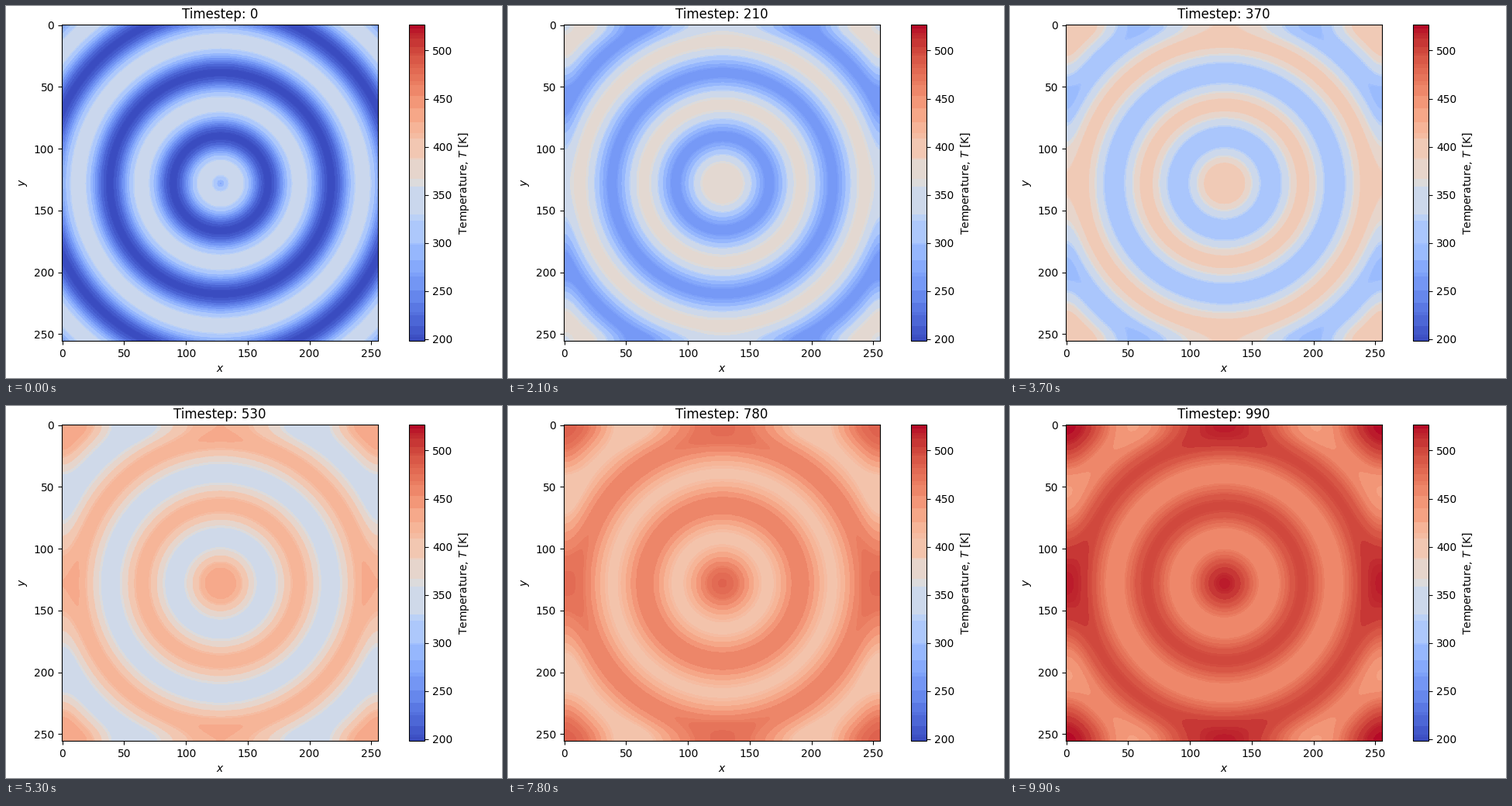
Animation, 640 px wide and 480 px high, one loop 10000 ms. Source, as a matplotlib script:

```python
import numpy as np
import matplotlib as mpl
import matplotlib.pyplot as plt
from matplotlib.animation import FuncAnimation
from matplotlib.colors import ListedColormap

W, H, DPI = 640, 480, 100
N = 256
FRAMES, STEP = 100, 10
T_MEAN, T_AMP = 273.15, 75.0
RINGS = 5               # wave periods across the domain
DIFFUSIVITY = 1 / 12    # cells^2 per timestep
HEATING = 0.206         # kelvin per timestep
T_MIN, T_MAX = T_MEAN - T_AMP, 527.0

# Radial wave on a periodic grid, diffused in Fourier space
y, x = np.mgrid[:N, :N]
wave = np.sin(2 * np.pi * RINGS / N * np.hypot(x - N / 2, y - N / 2))
spectrum = np.fft.rfft2(T_AMP * wave)
kx = 2 * np.pi * np.fft.rfftfreq(N)
ky = 2 * np.pi * np.fft.fftfreq(N)
k2 = kx[None, :] ** 2 + ky[:, None] ** 2


def temperature(t):
    decay = np.exp(-DIFFUSIVITY * k2 * t)
    return T_MEAN + HEATING * t + np.fft.irfft2(spectrum * decay, s=(N, N))


# Group the colormap into coarse RGB cells, which gives the flat bands
lut = mpl.colormaps["coolwarm"](np.arange(256), bytes=True)[:, :3].astype(int)
cells = (lut[:, 0] >> 5) * 128 + (lut[:, 1] >> 4) * 8 + (lut[:, 2] >> 5)
band = np.unique(cells, return_inverse=True)[1].ravel()
FIELD_AREA = (408 / N) ** 2
BAR_AREA = 408 * 19 / 256


def banded_cmap(field):
    """Each band takes the mean colour of the area it covers."""
    level = (field - T_MIN) / (T_MAX - T_MIN) * 256
    level = np.clip(level.astype(int), 0, 255).ravel()
    area = BAR_AREA + FIELD_AREA * np.bincount(level, minlength=256)
    total = np.bincount(band, area)
    mean = [np.bincount(band, area * lut[:, c]) / total for c in range(3)]
    return ListedColormap(np.floor(np.array(mean).T)[band] / 255)


def add_axes(left, top, width, height):
    return fig.add_axes([left / W, 1 - (top + height) / H, width / W, height / H])


fig = plt.figure(figsize=(W / DPI, H / DPI), dpi=DPI)
ax = add_axes(72, 24, 408, 408)
cax = add_axes(520, 24, 20.4, 408)

start = temperature(0)
image = ax.imshow(start, cmap=banded_cmap(start), vmin=T_MIN, vmax=T_MAX)
ax.set_xlabel("$x$")
ax.set_ylabel("$y$")
title = ax.set_title("Timestep: 0")
fig.colorbar(image, cax=cax, label="Temperature, $T$ [K]")


def update(i):
    t = i * STEP
    field = temperature(t)
    image.set_data(field)
    image.set_cmap(banded_cmap(field))
    title.set_text(f"Timestep: {t}")
    return image, title


anim = FuncAnimation(fig, update, frames=FRAMES, interval=100, repeat=True,
                     repeat_delay=0)
plt.show()
```
